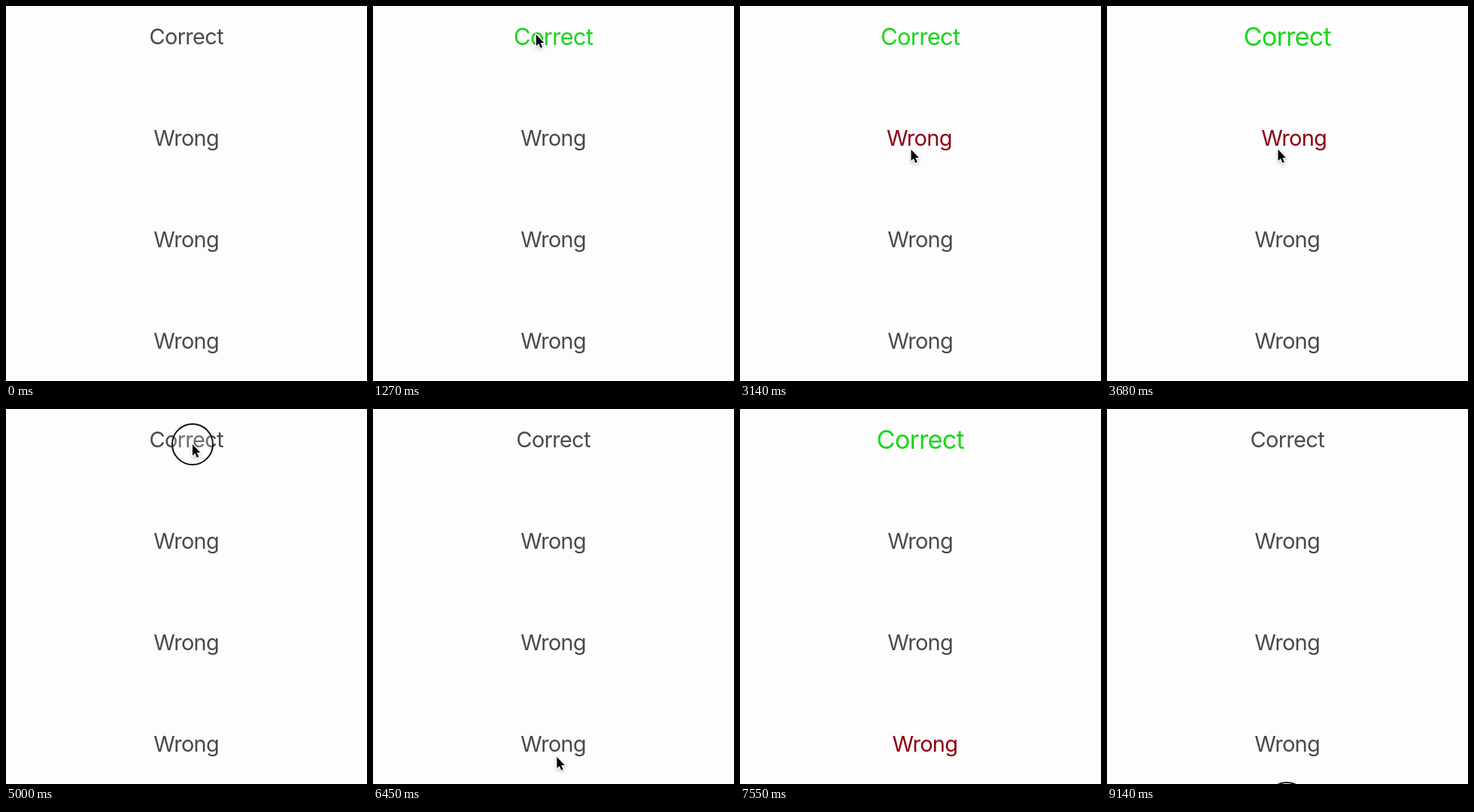
Recreate the animation shown at these times as an HTML page with a canvas. Size 480 by 499 pixels, loop 9190 ms.

```html
<!DOCTYPE html>
<html lang="en">
<head>
<meta charset="utf-8">
<title>Answer feedback</title>
<style>
  html, body { margin: 0; width: 100%; height: 100%; overflow: hidden; background: #fefdfe; }
  canvas { display: block; }
</style>
</head>
<body>
<canvas id="stage" width="480" height="499"></canvas>
<script>
const ctx = document.getElementById('stage').getContext('2d');
const LOOP = 9190, ANIM = 1000, FADE = 300, HOLD = 95;
const GRAY = [74, 74, 76], GREEN = [24, 216, 26], RED = [142, 0, 18];
const labels = ['Correct', 'Wrong', 'Wrong', 'Wrong'];
const arrow = new Path2D('M0 0V15L3.4 12L5.8 17.7L8.3 16.6L5.9 11H10.4Z');

// When the button is released, and on which label
const clicks = [
  { at: 1035, hit: 0 }, { at: 2908, hit: 1 }, { at: 5090, hit: 0 },
  { at: 6800, hit: 3 }, { at: LOOP + 35 }
];
// The pointer rests between moves
const entry = { x: 242, y: 476 };
const moves = [
  { from: 140, to: 860, x: 217, y: 38 },
  { from: 2100, to: 2410, x: 214, y: 89 },
  { from: 2410, to: 2750, x: 227.5, y: 191 },
  { from: 4370, to: 4700, x: 248, y: 47 },
  { from: 5930, to: 6400, x: 244.5, y: 463 },
  { from: 6460, to: 6650, x: 243, y: 455 },
  { from: 6920, to: 7400, x: 239, y: 524 }
];

const clamp = v => Math.min(1, Math.max(0, v));
const lerp = (a, b, k) => a + (b - a) * k;
const smooth = k => k * k * (3 - 2 * k);

// CSS "ease": cubic-bezier(.25, .1, .25, 1)
function ease(x) {
  const bez = (s, a, b) => 3 * s * (1 - s) * (1 - s) * a + 3 * s * s * (1 - s) * b + s * s * s;
  let lo = 0, hi = 1;
  for (let i = 0; i < 20; i++) {
    const mid = (lo + hi) / 2;
    if (bez(mid, .25, .25) < x) lo = mid; else hi = mid;
  }
  return bez(lo, .1, 1);
}

// Ten eased segments between 0, -10, +10, ... -10, 0
function shake(p) {
  const stop = i => i <= 0 || i >= 10 ? 0 : i % 2 ? -10 : 10;
  const i = Math.floor(p * 10);
  return lerp(stop(i), stop(i + 1), ease(p * 10 - i));
}

function pointerAt(t) {
  let { x, y } = entry;
  for (const m of moves) {
    const k = smooth(clamp((t - m.from) / (m.to - m.from)));
    x = lerp(x, m.x, k);
    y = lerp(y, m.y, k);
  }
  return [x, y];
}

function drawLabel(text, i, t) {
  let tint = 0, scale = 1, dx = 0;
  for (const { at, hit } of clicks) {
    const d = t - at;
    if (d < 0 || d > ANIM + FADE || (i && i !== hit)) continue;
    tint = ease(clamp(d / FADE)) - ease(clamp((d - ANIM) / FADE));
    if (d < ANIM) {
      if (i) dx = shake(d / ANIM);
      else scale = 1 + .19 * ease(d / ANIM);
    }
  }
  const goal = i ? RED : GREEN;
  ctx.save();
  ctx.translate(239.7 + dx, 41 + 135 * i);
  ctx.scale(scale, scale);
  ctx.fillStyle = `rgb(${GRAY.map((c, n) => Math.round(lerp(c, goal[n], tint)))})`;
  ctx.fillText(text, 0, 10.3);
  ctx.restore();
}

function drawPointer([x, y], pressed) {
  ctx.save();
  ctx.translate(x, y);
  if (pressed) {
    ctx.beginPath();
    ctx.arc(0, 0, 27, 0, 2 * Math.PI);
    ctx.fillStyle = 'rgba(255,255,255,.2)';
    ctx.fill();
    ctx.strokeStyle = '#111';
    ctx.lineWidth = 2;
    ctx.stroke();
  }
  ctx.shadowColor = 'rgba(0,0,0,.25)';
  ctx.shadowBlur = 4;
  ctx.shadowOffsetY = 2;
  ctx.strokeStyle = '#fff';
  ctx.lineWidth = 2;
  ctx.stroke(arrow);
  ctx.shadowColor = 'transparent';
  ctx.fillStyle = '#000';
  ctx.fill(arrow);
  ctx.restore();
}

function draw(now) {
  const t = now % LOOP;
  ctx.fillStyle = '#fefdfe';
  ctx.fillRect(0, 0, 480, 499);
  ctx.font = '29px Inter, "Open Sans", sans-serif';
  ctx.letterSpacing = '-0.7px';
  ctx.textAlign = 'center';
  labels.forEach((text, i) => drawLabel(text, i, t));
  if (t >= moves[0].from)
    drawPointer(pointerAt(t), clicks.some(c => t >= c.at - HOLD && t < c.at));
}

const begin = performance.now();
(function tick() {
  draw(performance.now() - begin);
  requestAnimationFrame(tick);
})();
</script>
</body>
</html>
```
